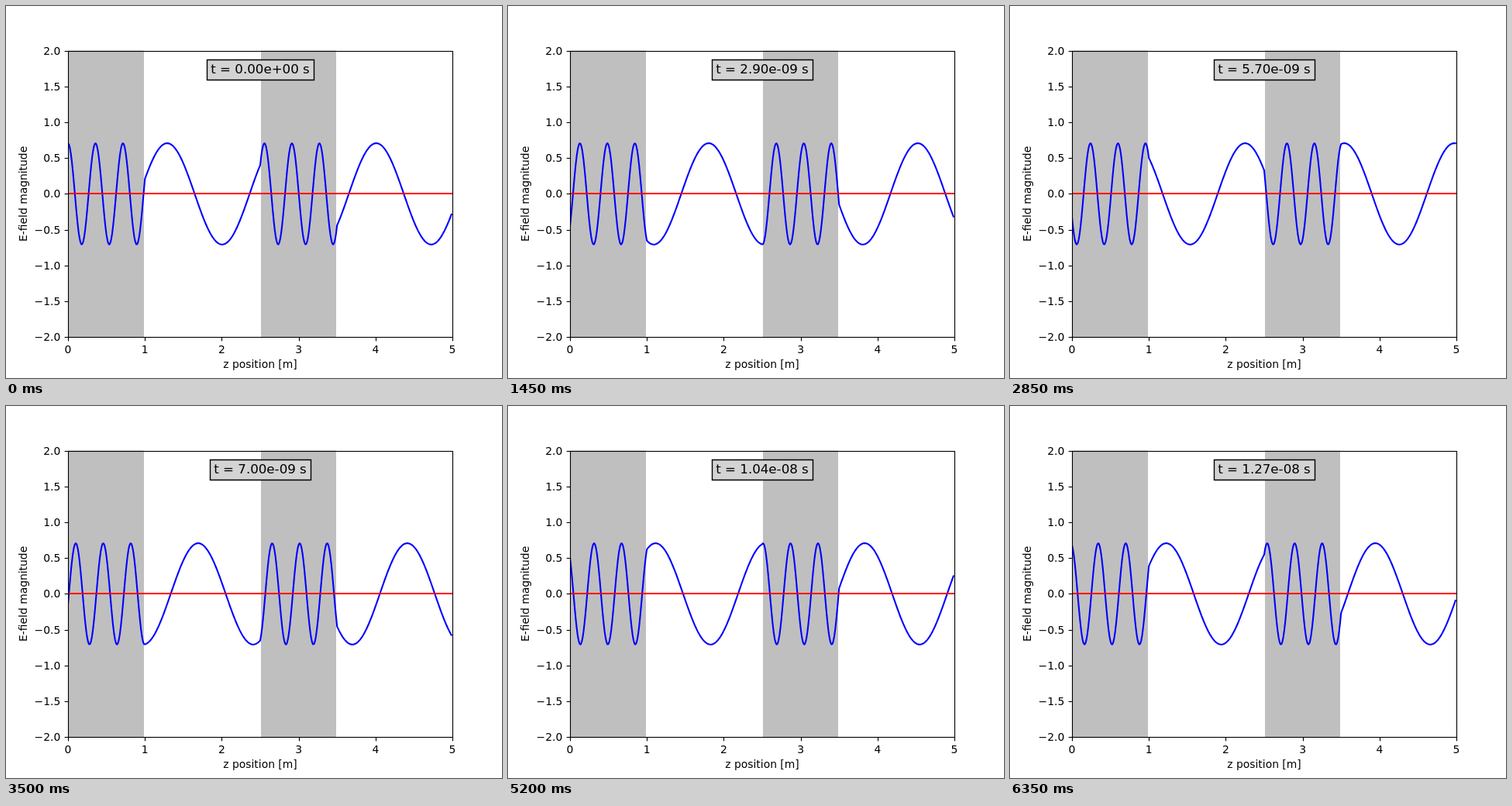
An HTML page with a canvas for the animation above (6400 ms loop, 640 by 480 pixels).

```html
<!DOCTYPE html>
<html lang="en">
<head>
<meta charset="utf-8">
<title>E-field through dielectric slabs</title>
<style>
  html, body { margin: 0; width: 100%; height: 100%; overflow: hidden; background: #fff; }
  canvas { display: block; }
</style>
</head>
<body>
<canvas id="plot" width="640" height="480"></canvas>
<script>
const ctx = document.getElementById('plot').getContext('2d');
const LEFT = 80, RIGHT = 576, TOP = 57.6, BOTTOM = 427.2;
const STEP_MS = 50, STEPS = 128;
const DZ = 0.0125, POINTS = 400;
const AMPLITUDE = Math.SQRT1_2, WAVENUMBER = 0.6993, FREQUENCY = 0.4689; // cycles per m, per ns

const px = z => LEFT + 99.2 * z;
const py = v => 242.4 - 92.4 * v;
const snap = p => Math.round(p) + 0.5;
const clamp01 = v => Math.min(1, Math.max(0, v));

// The slabs at 0..1 m and 2.5..3.5 m have a refractive index of 4.
const opticalPath = z => z + 3 * clamp01(z) + 3 * clamp01(z - 2.5);
const field = (z, ns) =>
  AMPLITUDE * Math.cos(2 * Math.PI * (WAVENUMBER * opticalPath(z) - FREQUENCY * ns));

function stroke(color, width, points) {
  ctx.strokeStyle = color;
  ctx.lineWidth = width;
  ctx.beginPath();
  points.forEach(([x, y]) => ctx.lineTo(x, y));
  ctx.stroke();
}

function text(str, x, y, align = 'center', size = 13.889) {
  ctx.font = `${size}px "DejaVu Sans", sans-serif`;
  ctx.textAlign = align;
  ctx.fillStyle = '#000';
  ctx.fillText(str, x, y);
}

function drawAxes() {
  ctx.lineCap = 'butt';
  for (let z = 0; z <= 5; z++) {
    const x = snap(px(z));
    stroke('#000', 1.11, [[x, 427.5], [x, 432.4]]);
    text(z, px(z), 448);
  }
  for (let v = -2; v <= 2; v += 0.5) {
    const y = snap(py(v));
    stroke('#000', 1.11, [[75.6, y], [80.5, y]]);
    text(v.toFixed(1).replace('-', '\u2212'), 70.3, y + 4.5, 'right');
  }
  ctx.lineWidth = 1.11;
  ctx.strokeRect(80.5, 58.5, 496, 369);
  text('z position [m]', 328, 467);
  ctx.save();
  ctx.translate(27, 242.4);
  ctx.rotate(-Math.PI / 2);
  text('E-field magnitude', 0, 0);
  ctx.restore();
}

function drawClock(step) {
  const value = (step * 1e-10).toExponential(2).replace(/\d+$/, d => d.padStart(2, '0'));
  const label = `t = ${value} s`;
  ctx.font = '16.667px "DejaVu Sans", sans-serif';
  const half = Math.round(ctx.measureText(label).width / 2 + 5.2);
  ctx.fillStyle = '#d3d3d3';
  ctx.strokeStyle = '#000';
  ctx.lineWidth = 1.39;
  ctx.beginPath();
  ctx.rect(328.5 - half, 69.5, 2 * half, 26);
  ctx.fill();
  ctx.stroke();
  text(label, 328, 87, 'center', 16.667);
}

function draw(step) {
  ctx.fillStyle = '#fff';
  ctx.fillRect(0, 0, 640, 480);

  ctx.save();
  ctx.beginPath();
  ctx.rect(LEFT, TOP, RIGHT - LEFT, BOTTOM - TOP);
  ctx.clip();
  ctx.fillStyle = '#bfbfbf';
  ctx.fillRect(80, 57, 98, 371);
  ctx.fillRect(329, 57, 97, 371);
  ctx.lineCap = 'square';
  ctx.lineJoin = 'round';
  const wave = Array.from({ length: POINTS }, (_, i) =>
    [px(i * DZ), py(field(i * DZ, step / 10))]);
  stroke('#00f', 2.083, wave);
  stroke('#f00', 2.083, [[LEFT, 242], [px(4.9875), 242]]);
  ctx.restore();

  drawAxes();
  drawClock(step);
}

const start = performance.now();
function tick() {
  draw(Math.floor((performance.now() - start) / STEP_MS) % STEPS);
  requestAnimationFrame(tick);
}
tick();
</script>
</body>
</html>
```
